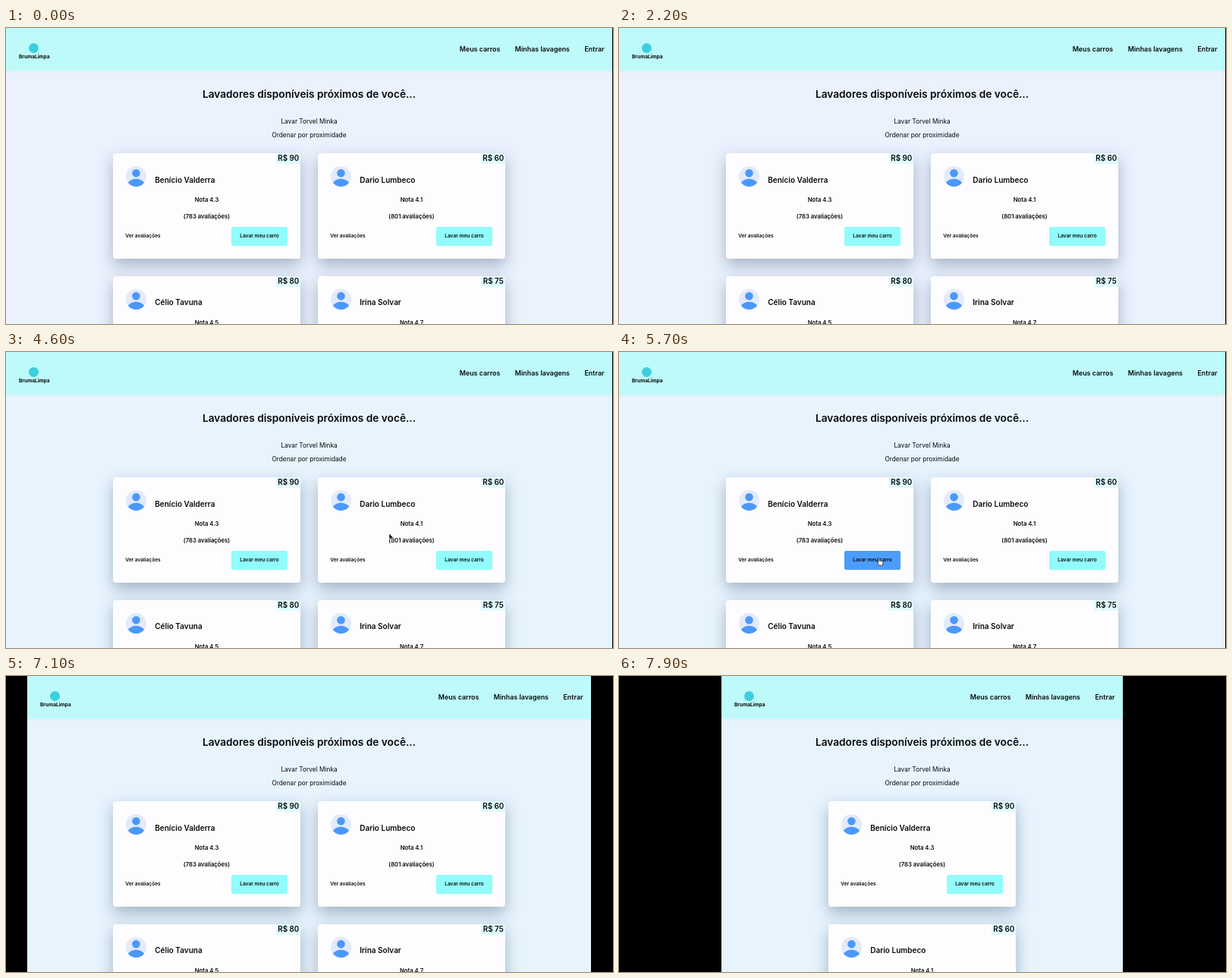
Animation, 800 px wide and 390 px high, one loop 8 s. Source, as an HTML page:

```html
<!DOCTYPE html>
<html lang="pt-BR">
<head>
<meta charset="utf-8">
<style>
  html, body { margin: 0; width: 100%; height: 100%; overflow: hidden; background: #000; }
  body { position: relative; font: 600 8.9px/16px Inter, sans-serif; color: #080a0c; white-space: nowrap; }
  #page { position: absolute; top: 0; height: 390px; overflow: hidden; }
  header { position: absolute; width: 100%; height: 56px; background: #befafa; box-shadow: 0 1px 3px #9cc8d833; }
  .mark { position: absolute; left: 29.5px; top: 20px; width: 13px; height: 13px; border-radius: 50%; background: #3ccfdd; }
  .brand { position: absolute; left: 17px; top: 29.5px; font-size: 6.6px; font-weight: 700; }
  nav { position: absolute; right: 10.5px; top: 20px; display: flex; gap: 19.5px; }
  .line { position: absolute; width: 100%; text-align: center; font-size: 8.3px; font-weight: 400; }
  h1.line { margin: 0; top: 79px; font-size: 13.7px; font-weight: 600; }
  main { position: absolute; top: 153.75px; width: 100%; display: flex; flex-wrap: wrap; justify-content: center; }
  .card { position: relative; width: 247.5px; height: 139px; margin: 11.25px; border-radius: 4px;
    background: #fdfdff; box-shadow: 0 8px 20px rgba(65, 85, 115, .42); }
  .card > * { position: absolute; }
  .price { right: 0; top: 0; width: 32px; height: 14px; line-height: 14px; text-align: center;
    font-size: 9.8px; background: #e0fafd; border-top-right-radius: 4px; }
  .card svg { left: 17px; top: 17px; }
  .name { left: 55.5px; top: 26.5px; font-size: 10px; }
  .note { width: 100%; text-align: center; font-size: 7.7px; }
  .small { font-size: 6.6px; }
  .wash { left: 156px; top: 97px; width: 74.5px; height: 25px; line-height: 25px;
    border-radius: 2px; text-align: center; background: #92fbfc; }
  #cursor { position: absolute; left: 0; top: 0; overflow: visible; }
</style>
</head>
<body>
<div id="page">
  <header>
    <div class="mark"></div>
    <div class="brand">BrumaLimpa</div>
    <nav><span>Meus carros</span><span>Minhas lavagens</span><span>Entrar</span></nav>
  </header>
  <h1 class="line">Lavadores disponíveis próximos de você...</h1>
  <div class="line" style="top:114.5px">Lavar Torvel Minka</div>
  <div class="line" style="top:133px">Ordenar por proximidade</div>
  <main></main>
</div>
<svg id="cursor" width="12" height="14" stroke-linejoin="round">
  <path id="arrow" d="M0 0V8L1.9 6.4 3.1 9.2 4.5 8.6 3.3 5.9H5.7Z" fill="#111" stroke="#fff" stroke-width=".6"/>
  <path id="hand" d="M0 .8Q.8-.5 1.6.8V4L5.4 4.8Q6.4 5.2 6 7L5.2 10.2H1L-1.8 6.2Q-1.8 5 0 6.2Z"
    fill="#fff" stroke="#222" stroke-width=".8"/>
</svg>
<script>
const LOOP = 8000, STEP = 100, FADE = 300;
const $ = s => document.querySelector(s);

const washers = [
  ['Benício Valderra', 90, '4.3', 783], ['Dario Lumbeco', 60, '4.1', 801],
  ['Célio Tavuna', 80, '4.5', 652], ['Irina Solvar', 75, '4.7', 714]
];
$('main').innerHTML = washers.map(([name, price, score, count]) => `
  <div class="card">
    <div class="price">R$ ${price}</div>
    <svg width="27" height="27">
      <clipPath id="disc"><circle cx="13.5" cy="13.5" r="13.5"/></clipPath>
      <g clip-path="url(#disc)">
        <rect width="27" height="27" fill="#e2eafb"/>
        <g fill="#4a98fa"><circle cx="13.5" cy="9.3" r="5.3"/><ellipse cx="13.5" cy="27" rx="12.3" ry="10.3"/></g>
      </g>
    </svg>
    <div class="name">${name}</div>
    <div class="note" style="top:54px">Nota ${score}</div>
    <div class="note" style="top:75.5px">(${count} avaliações)</div>
    <div class="small" style="left:16.5px;top:101px">Ver avaliações</div>
    <div class="small wash">Lavar meu carro</div>
  </div>`).join('');

// Pointer tip: time, x, y
const path = [
  [700, 801, 26], [800, 776, 26], [1100, 640, 27], [1300, 640, 27], [1500, 690, 28],
  [1800, 770, 27], [2000, 801, 40], [2800, 801, 30], [3300, 409, 113], [3900, 500, 232],
  [4500, 500, 232], [4600, 505, 239], [5400, 335, 264], [5700, 342, 271], [6100, 342, 271],
  [6300, 757, 137], [6500, 801, 118]
];
// Hover zones: left, top, right, bottom
const links = [[594, 18, 655, 38], [667, 18, 747, 38], [758, 18, 792, 38]];
const button = [297, 262, 371, 287];

const mix = (a, b, k) => a + (b - a) * k;
const clamp = k => Math.max(0, Math.min(1, k));
const blend = (a, b, k) => `rgb(${a.map((v, i) => Math.round(mix(v, b[i], k)))})`;

function pointer(t) {
  const i = path.findIndex(p => p[0] > t);
  if (i <= 0) return [830, 26];
  const [a, b] = [path[i - 1], path[i]], k = (t - a[0]) / (b[0] - a[0]);
  return [mix(a[1], b[1], k), mix(a[2], b[2], k)];
}
const inside = ([l, t, r, b], [x, y]) => x >= l && x <= r && y >= t && y <= b;

// Linear fade: share of the last FADE ms spent inside the zone
function hover(zone, t) {
  let hits = 0;
  for (let k = 0; k < 10; k++) hits += inside(zone, pointer(t - k * FADE / 10));
  return hits / 10;
}

function render(t) {
  const resizing = t >= 7100, k = clamp((t - 7100) / 800);
  const left = resizing ? mix(28, 135, k) : 0;
  const page = $('#page').style;
  page.left = left + 'px';
  page.width = 799 - 2 * left + 'px';
  page.background = blend([235, 242, 254], [231, 244, 254], clamp((t - 3700) / 600));

  links.forEach((zone, i) => {
    $('nav').children[i].style.fontSize = 8.9 * (1 + .015 * hover(zone, t)) + 'px';
  });
  $('.wash').style.background = blend([146, 251, 252], [76, 157, 250], hover(button, t));

  const pos = pointer(t), onLink = [...links, button].some(z => inside(z, pos));
  $('#cursor').style.transform = `translate(${pos[0]}px,${pos[1]}px)`;
  $('#arrow').style.display = onLink ? 'none' : '';
  $('#hand').style.display = onLink ? '' : 'none';
}

function frame() {
  render(Math.floor(performance.now() % LOOP / STEP) * STEP);
  requestAnimationFrame(frame);
}
frame();
</script>
</body>
</html>
```
